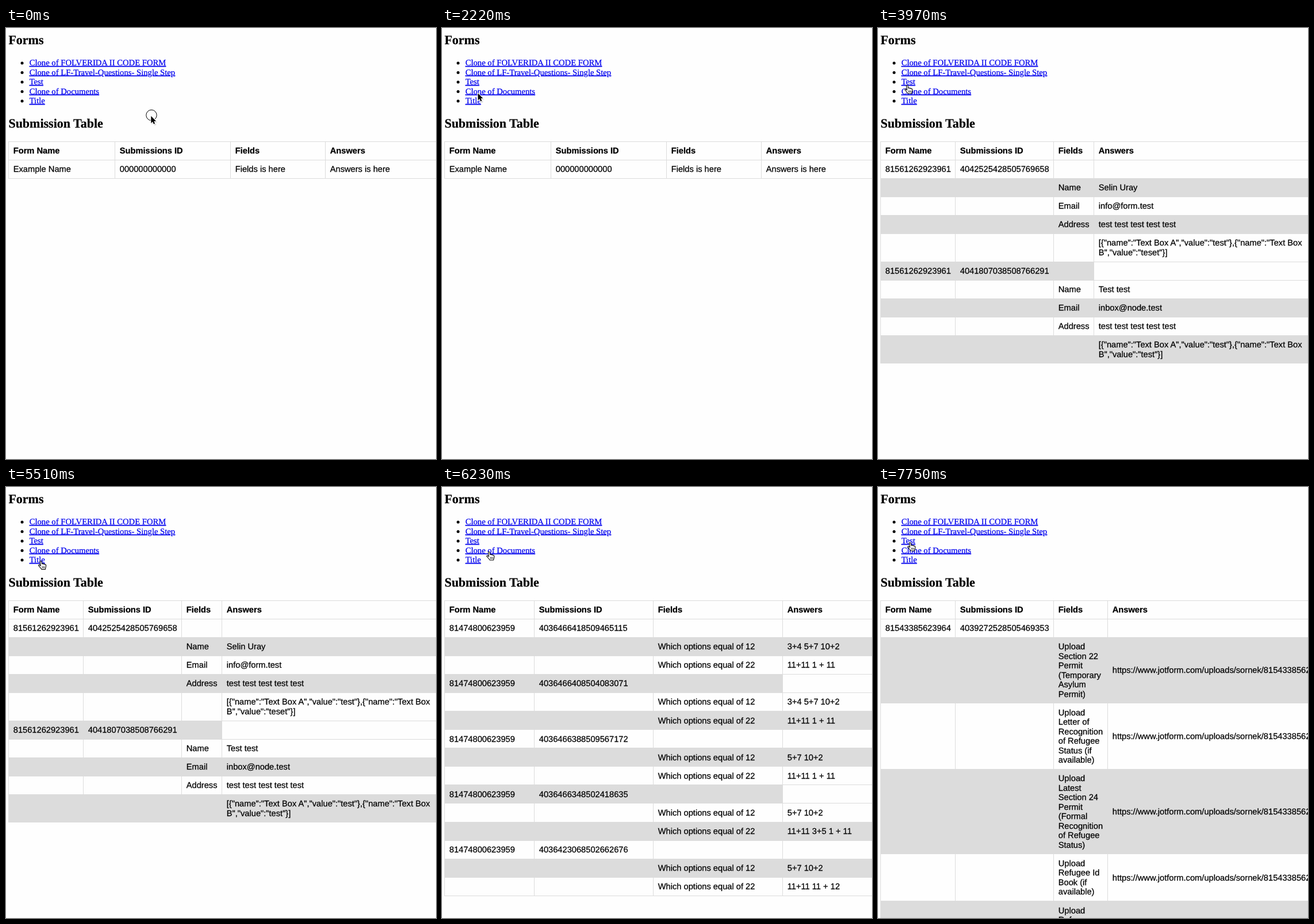
Animation, 748 px wide and 749 px high, one loop 8 s. Source, as an HTML page:

```html
<!DOCTYPE html>
<html lang="en">
<head>
<meta charset="utf-8">
<title>Submission Table</title>
<style>
  html, body { margin: 0; width: 100%; height: 100%; overflow: hidden; background: #fefefe; }
  svg { display: block; width: 748px; height: 749px; }
  text {
    font: 14.667px "Liberation Sans", Arial, sans-serif; text-rendering: geometricPrecision; white-space: pre;
    color: #000; fill: currentColor; stroke: currentColor; stroke-width: .25px;
  }
  .head { font-weight: bold; }
  .title { font: bold 22px "Liberation Serif", Times, serif; }
  .link { font-family: "Liberation Serif", Times, serif; color: #0000ee; text-decoration: underline; }
</style>
</head>
<body>
<svg id="stage" viewBox="0 0 748 749" xmlns="http://www.w3.org/2000/svg">
  <rect width="748" height="749" fill="#fefefe"/>
  <g id="page"></g>
  <circle id="ring" cx="253" cy="151.5" r="9.2" fill="none" stroke="#000"/>
  <g id="arrow">
    <path d="M2 2.5V15.5L5 12.5 7 17 10 15.5 8 11.5H12Z" fill="#000" opacity=".16"/>
    <path d="M.8.5V12.9L3.6 10.2 5.5 14.5 7.6 13.6 5.8 9.4H9.6Z" fill="#000" stroke="#fff" stroke-width="1.8" paint-order="stroke"/>
  </g>
  <g id="hand" stroke="#000" stroke-linejoin="round" stroke-linecap="round">
    <path d="M-1.6.7C-1.6-.8.8-1 1 .5L1.7 4.6C2.6 3.6 3.9 3.9 4.2 5 5 4.2 6.4 4.6 6.6 5.8 7.6 5.2 8.8 5.8 8.8 7 9 10 8 11 7.6 14H1.2C-.4 11.5-2.5 9.6-4 7.6-4.6 6.2-2.8 5.4-1.6 6.8L-.5 8Z" fill="#fff" stroke-width="1.1"/>
    <path d="M2.3 9V11.6M4.2 9V11.6M6.1 9V11.6" fill="none" stroke-width=".8"/>
  </g>
</svg>
<script>
const LOOP = 8000, LINE = 16.5, PAD = 15.583, LEFT = 4, TOP = 197.05, GREY = '#dcdcdc';
const $ = id => document.getElementById(id);
const page = $('page');

function add(parent, tag, attrs, text) {
  const el = document.createElementNS('http://www.w3.org/2000/svg', tag);
  for (const k in attrs) el.setAttribute(k, attrs[k]);
  if (text !== undefined) el.textContent = text;
  parent.appendChild(el);
  return el;
}
const box = (g, x, y, width, height) => add(g, 'rect', { x, y, width, height, fill: GREY });

// Headings and links
add(page, 'text', { x: 4.4, y: 28, class: 'title' }, 'Forms');
add(page, 'text', { x: 4.4, y: 173, class: 'title' }, 'Submission Table');
const links = [
  'Clone of FOLVERIDA II CODE FORM', 'Clone of LF-Travel-Questions- Single Step',
  'Test', 'Clone of Documents', 'Title'
].map((label, i) => {
  const y = 65 + LINE * i;
  add(page, 'circle', { cx: 28, cy: y - 4, r: 2.5 });
  return add(page, 'text', { x: 40.7, y, class: 'link' }, label);
});

// Every second row is grey; a row with three cells leaves its last column white
function table(cols, rows) {
  const g = add(page, 'g', {});
  let y = TOP;
  [['Form Name', 'Submissions ID', 'Fields', 'Answers'], ...rows].forEach((row, r) => {
    const cells = row.map(c => c.split('\n'));
    const n = Math.max(...cells.map(c => c.length));
    const next = y + n * LINE + PAD;
    const top = Math.floor(y), h = Math.floor(next) - top + 1;
    box(g, LEFT, top, 748 - LEFT, 1);
    cols.forEach(x => box(g, x, top, 1, h));
    if (r && r % 2 === 0) box(g, LEFT, top, (row.length < 4 ? cols[3] + 1 : 748) - LEFT, h);
    cells.forEach((lines, c) => lines.forEach((s, i) => {
      if (!s) return;
      const base = Math.round(y + 21 + LINE * (i + (n - lines.length) / 2));
      add(g, 'text', { x: cols[c] + 8.75, y: base, class: r ? '' : 'head' }, s);
    }));
    y = next;
  });
  box(g, LEFT, Math.floor(y), 748 - LEFT, 1);
  return g;
}

const field = (name, answer) => ['', '', name, answer];
const boxes = b => `[{"name":"Text Box A","value":"test"},{"name":"Text Box\nB","value":"${b}"}]`;
const words = 'test test test test test';
const quiz = (id, a, b, last) => [
  ['81474800623959', id, '', ...(last ? [''] : [])],
  field('Which options equal of 12', a), field('Which options equal of 22', b)
];
const url = 'https://www.jotform.com/uploads/sornek/81543385623964/';

const tables = [
  [0, table([LEFT, 189, 390, 555], [['Example Name', '000000000000', 'Fields is here', 'Answers is here']])],
  [3970, table([LEFT, 134, 305, 375], [
    ['81561262923961', '4042525428505769658', '', ''],
    field('Name', 'Selin Uray'), field('Email', 'info@form.test'),
    field('Address', words), field('', boxes('teset')),
    ['81561262923961', '4041807038508766291', ''],
    field('Name', 'Test test'), field('Email', 'inbox@node.test'),
    field('Address', words), field('', boxes('test'))
  ])],
  [5570, table([LEFT, 160, 367, 592], [
    ...quiz('4036466418509465115', '3+4 5+7 10+2', '11+11 1 + 11', true),
    ...quiz('4036466408504083071', '3+4 5+7 10+2', '11+11 1 + 11'),
    ...quiz('4036466388509567172', '5+7 10+2', '11+11 1 + 11', true),
    ...quiz('4036466348502418635', '5+7 10+2', '11+11 3+5 1 + 11'),
    ...quiz('4036423068502662676', '5+7 10+2', '11+11 11 + 12', true)
  ])],
  [6950, table([LEFT, 134, 305, 399], [
    ['81543385623964', '4039272528505469353', '', ''],
    field('Upload\nSection 22\nPermit\n(Temporary\nAsylum\nPermit)', url),
    field('Upload\nLetter of\nRecognition\nof Refugee\nStatus (if\navailable)', url),
    field('Upload\nLatest\nSection 24\nPermit\n(Formal\nRecognition\nof Refugee\nStatus)', url),
    field('Upload\nRefugee Id\nBook (if\navailable)', url),
    field('Upload\nRefugee\nTravel\nDocument\n(if\navailable)', url)
  ])]
];

// Link presses: start, end, link
const presses = [[3140, 3260, 2], [4610, 4730, 4], [6120, 6230, 3]];

// Pointer moves: first step, last step, number of steps, evenly timed points
const moves = [
  [750, 1520, 14, [[251.5, 152.5], [256, 134], [340, 165], [455, 260], [523, 395], [441, 465.5], [305, 487], [179, 448]]],
  [1580, 1920, 7, [[179, 448], [135, 320], [92, 180], [68, 119]]],
  [2220, 2680, 7, [[68, 119], [56, 107], [45, 93], [45, 92], [50, 101]]],
  [2850, 2910, 2, [[50, 101], [51, 100]]],
  [4270, 4550, 6, [[51, 100], [53, 110], [57, 124], [59, 131]]],
  [5510, 5940, 7, [[59, 131], [65, 125], [77, 115], [82, 113]]],
  [7190, 7750, 8, [[82, 113], [74, 107], [62, 99], [56, 97]]]
];
// The first sweep slows a little before its fifth point
const warp = p => p < 11 / 14 ? p * 10 / 11 : 1 - (1 - p) * 4 / 3;

function spline(pts, p) {
  const last = pts.length - 1, i = Math.min(last - 1, Math.floor(p * last)), u = p * last - i;
  const at = k => pts[Math.max(0, Math.min(last, k))];
  return [0, 1].map(d => {
    const [a, b, c, e] = [at(i - 1)[d], at(i)[d], at(i + 1)[d], at(i + 2)[d]];
    return b + u * (c - a + u * (2 * a - 5 * b + 4 * c - e + u * (3 * (b - c) + e - a))) / 2;
  });
}

function pointer(t) {
  let m = null;
  for (const move of moves) if (t >= move[0]) m = move;
  if (!m) return moves[0][3][0];
  const [start, end, n, pts] = m;
  const step = Math.min(n, 1 + Math.floor((t - start) * (n - 1) / (end - start) + 0.1));
  return spline(pts, m === moves[0] ? warp(step / n) : step / n);
}

const show = (el, on) => { el.style.display = on ? '' : 'none'; };

function draw(t) {
  tables.forEach(([from, g], i) => show(g, t >= from && (!tables[i + 1] || t < tables[i + 1][0])));
  links.forEach((el, i) => {
    el.style.color = presses.some(([a, b, k]) => k === i && t >= a && t < b) ? '#f00' : '';
  });
  const [x, y] = pointer(t), overLink = t >= 2280;
  show($('ring'), t < 60);
  show($('arrow'), !overLink);
  show($('hand'), overLink);
  $(overLink ? 'hand' : 'arrow').setAttribute('transform', `translate(${x.toFixed(1)} ${y.toFixed(1)})`);
}

const began = performance.now();
function tick() {
  draw((performance.now() - began) % LOOP);
  requestAnimationFrame(tick);
}
tick();
</script>
</body>
</html>
```
